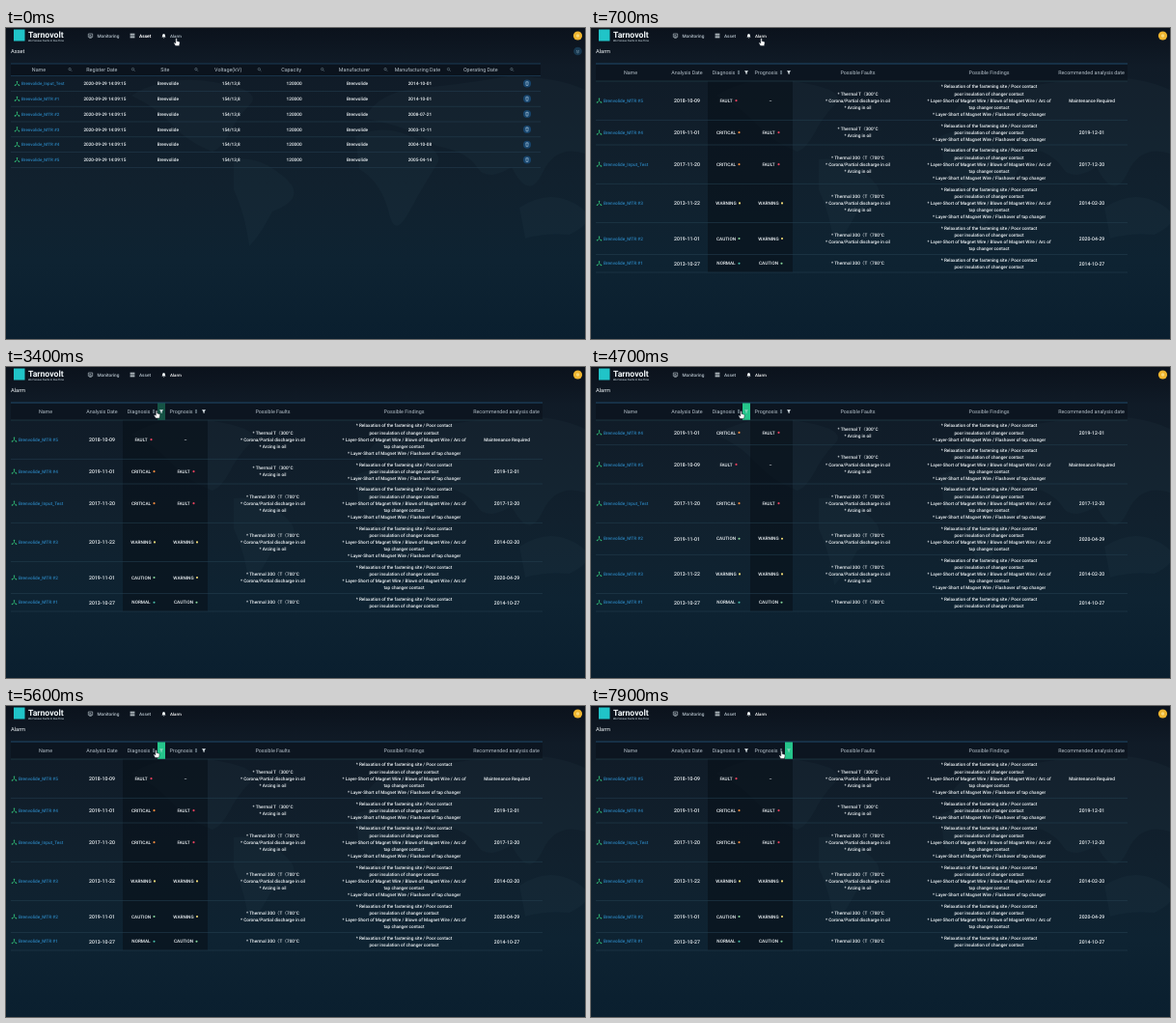
An HTML page for the animation above (8 s loop, 600 by 322 pixels).

```html
<!DOCTYPE html>
<html lang="en">
<head>
<meta charset="utf-8">
<title>Alarm table</title>
<style>
html, body { margin: 0; width: 100%; height: 100%; overflow: hidden; background: #0b1c29; }
svg { display: block; width: 100%; height: 100%; }
text { font-family: Roboto, "Noto Sans CJK KR", "Noto Sans CJK", sans-serif; text-rendering: geometricPrecision; white-space: pre; }
</style>
</head>
<body>
<svg id="stage" viewBox="0 0 600 322" preserveAspectRatio="none"></svg>
<script>
const stage = document.getElementById('stage');
const COMPANY = 'Brenvolide';
const BLUE = '#2a80b8', PALE = '#eef3f6', HEAD = '#b6c2cb', RULE = '#223c4d';

// y is the vertical middle of the text
const text = (x, y, s, size = 4.7, fill = PALE, anchor = 'middle', weight = 500) =>
  `<text x="${x}" y="${y + size * 0.36}" font-size="${size}" fill="${fill}" text-anchor="${anchor}" font-weight="${weight}">${s}</text>`;
const rect = (x, y, w, h, fill, extra = '') =>
  `<rect x="${x}" y="${y}" width="${w}" height="${h}" fill="${fill}" ${extra}/>`;
const dot = (x, y, r, fill) => `<circle cx="${x}" cy="${y}" r="${r}" fill="${fill}"/>`;
const path = (x, y, d, attrs) => `<path transform="translate(${x} ${y})" d="${d}" ${attrs}/>`;
const rule = (y, x2, color = RULE, w = 0.6) => rect(5, y - w / 2, x2 - 5, w, color);
const group = (id, body) => `<g id="${id}">${body}</g>`;

const treeIcon = (x, y) => path(x, y, 'M0-2V0M-2 2L0 0 2 2', 'stroke="#2fb573" stroke-width=".8" fill="none"') +
  [[0, -1.8], [-2, 1.8], [2, 1.8]].map(([a, b]) => dot(x + a, y + b, 0.8, '#2fb573')).join('');
const searchIcon = (x, y) => path(x, y, 'M.5.5L1.8 1.8M.8-.4a1.2 1.2 0 1 1-2.4 0a1.2 1.2 0 1 1 2.4 0', 'stroke="#7e94a1" stroke-width=".5" fill="none"');
const sortIcon = (x, y) => path(x, y, 'M-1.2-.6L0-2.2 1.2-.6ZM-1.2.6L0 2.2 1.2.6Z', 'fill="#9fb2bd"');
const funnel = (x, y) => path(x, y, 'M-2-1.8H2L.6.2V2L-.6 1.4V.2Z', `id="funnel${x}" fill="#dfe8ec"`);

function background() {
  const lands = [
    'M130 70Q165 48 215 56T254 78Q240 92 232 108T214 128Q188 118 172 100T130 70Z',
    'M236 136Q262 132 288 154T276 190Q264 214 252 226Q247 190 236 168Z',
    'M362 112Q392 98 424 114T446 142Q432 164 418 190T398 196Q390 160 366 146Z',
    'M372 94Q384 66 430 62T520 50Q570 50 600 64V130Q570 120 556 150T524 144Q498 160 488 144T446 122Q420 102 372 94Z',
    'M532 186Q562 166 590 182T584 214Q556 212 538 218Z'
  ];
  return `<defs>
    <linearGradient id="sky" x2="0" y2="1">
      <stop offset="0" stop-color="#0b121c"/><stop offset=".12" stop-color="#101b27"/>
      <stop offset=".5" stop-color="#11212e"/><stop offset=".75" stop-color="#0e2332"/>
      <stop offset="1" stop-color="#0a1f2f"/>
    </linearGradient></defs>` +
    rect(0, 0, 600, 322, 'url(#sky)') +
    `<path d="${lands.join('')}" fill="#3d566a" opacity=".09"/>`;
}

function topBar() {
  const stroke = 'stroke="#c4d0d7" stroke-width=".6" fill="none"';
  return rect(8, 1.5, 11.5, 12, '#20c4c8') +
    text(23, 6.5, 'Tarnovolt', 8.7, '#f2f7f9', 'start', 700) +
    text(23, 13.2, 'We Foresee Faults In Due Time', 2.7, '#bccbd3', 'start') +
    path(87.5, 8, 'M-2.2-2H2.2V1.4H-2.2ZM-1.2 2.4H1.2M-1 .5V-.6M0 .5V-1M1 .5V-.2', stroke) +
    path(131, 8, 'M-2.4-1.8H2.4M-2.4 0H2.4M-2.4 1.8H2.4', 'stroke="#dce5ea" stroke-width="1.1"') +
    path(163.5, 8, 'M-2 1.4Q-1.4.8-1.4-.6A1.4 1.5 0 0 1 1.4-.6Q1.4.8 2 1.4ZM-.7 1.9H.7L0 2.6Z', 'fill="#eef3f5"') +
    text(94.5, 8, 'Monitoring', 4.7, HEAD, 'start') +
    dot(592.5, 8, 4.6, '#efb52f') + dot(592.5, 8, 1.7, '#f8d878');
}

function assetPage() {
  const heads = ['Name', 'Register Date', 'Site', 'Voltage(kV)', 'Capacity', 'Manufacturer', 'Manufacturing Date', 'Operating Date'];
  const made = ['2014-10-01', '2014-10-01', '2008-07-21', '2003-12-11', '2004-10-08', '2005-04-14'];
  const col = i => 34 + i * 65.4;
  let out = text(138, 8, 'Asset', 4.75, '#fff', 'start', 700) + text(170, 8, 'Alarm', 4.4, HEAD, 'start') +
    text(5, 24, 'Asset', 5.7, PALE, 'start', 400) +
    dot(592.5, 24, 4.3, '#173850') + path(592.5, 24, 'M-1.5-1L0 .2 1.5-1M-1.5.6L0 1.8 1.5.6', 'stroke="#89a4b5" stroke-width=".6" fill="none"') +
    rect(5, 37, 549, 12, '#0a111a', 'opacity=".75"') + rule(37, 554, '#1f4968', 0.7) + rule(49.3, 554, '#1f4460');
  heads.forEach((h, i) => out += text(col(i), 43, h, 5.4, HEAD, 'middle', 400) + searchIcon(66.5 + i * 65.4, 43));
  made.forEach((date, i) => {
    const y = 57.5 + i * 15.8;
    const cells = ['2020-09-29 14:09:15', COMPANY, '154/13,8', '120000', COMPANY, date];
    out += treeIcon(11.5, y) + text(16, y, `${COMPANY}_${i ? 'MTR #' + i : 'Input_Test'}`, 4.5, BLUE, 'start') +
      cells.map((c, k) => text(col(k + 1) + (k > 4 ? 2.5 : 3), y, c)).join('') +
      dot(540, y, 4, '#17456d') + path(540, y, 'M-1.6-1.5H1.6M-.6-2.1H.6M-1.2-1.2L-.9 2H.9L1.2-1.2', 'stroke="#a9c8df" stroke-width=".6" fill="none"') +
      rule(y + 7.9, 554);
  });
  return out;
}

const LOW = '* Thermal T〈300°C', HIGH = '* Thermal 300〈T〈700°C';
const CORONA = '* Corona/Partial discharge in oil', ARC = '* Arcing in oil';
const LOOSE = ['* Relaxation of the fastening site / Poor contact', 'poor insulation of changer contact'];
const BLOWN = ['* Layer-Short of Magnet Wire / Blown of Magnet Wire / Arc of', 'tap changer contact'];
const FLASH = '* Layer-Short of Magnet Wire / Flashover of tap changer';
const ALL = [...LOOSE, ...BLOWN, FLASH];
const ALARMS = {
  5: ['MTR #5', '2018-10-09', 'FAULT', '–', [LOW, CORONA, ARC], ALL, 'Maintenance Required'],
  4: ['MTR #4', '2019-11-01', 'CRITICAL', 'FAULT', [LOW, ARC], [...LOOSE, FLASH], '2019-12-01'],
  0: ['Input_Test', '2017-11-20', 'CRITICAL', 'FAULT', [HIGH, CORONA, ARC], ALL, '2017-12-20'],
  3: ['MTR #3', '2013-11-22', 'WARNING', 'WARNING', [HIGH, CORONA, ARC], ALL, '2014-02-20'],
  2: ['MTR #2', '2019-11-01', 'CAUTION', 'WARNING', [HIGH, CORONA], [...LOOSE, ...BLOWN], '2020-04-29'],
  1: ['MTR #1', '2013-10-27', 'NORMAL', 'CAUTION', [HIGH], LOOSE, '2014-10-27']
};
const LEVELS = { FAULT: '#e5405c', CRITICAL: '#ef8a3e', WARNING: '#f3dc78', CAUTION: '#86d59a', NORMAL: '#48bda9' };

const lines = (x, y, list) => list.map((s, i) => text(x, y + (i - (list.length - 1) / 2) * 7.2, s)).join('');
function status(x, y, level) {
  const gap = { FAULT: 10.5, WARNING: 14 }[level] || 13.5;
  return text(x + (level in LEVELS ? 0 : 2), y, level) + (level in LEVELS ? dot(x + gap, y, 1.05, LEVELS[level]) : '');
}

function alarmRows(order) {
  let top = 55, out = '';
  for (const id of order) {
    const [name, date, diagnosis, prognosis, faults, findings, next] = ALARMS[id];
    const height = findings.length * 7.25 + 4, y = top + height / 2;
    out += treeIcon(8.5, y) + text(13, y, `${COMPANY}_${name}`, 4.7, BLUE, 'start') +
      text(99.5, y, date, 5.2) + status(140, y, diagnosis) + status(184, y, prognosis) +
      lines(276.5, y, faults) + lines(412.5, y, findings) +
      text(519, y, next, next.length > 10 ? 4.75 : 5.1);
    top += height;
    out += rule(top, 556);
  }
  return out;
}

function alarmPage() {
  const heads = [[41, 'Name'], [99.5, 'Analysis Date'], [137.5, 'Diagnosis'], [181.5, 'Prognosis'],
    [276.5, 'Possible Faults'], [412.5, 'Possible Findings'], [518.5, 'Recommended analysis date']];
  return text(138, 8, 'Asset', 4.7, HEAD, 'start') + text(170, 8, 'Alarm', 4.4, '#fff', 'start') +
    text(5, 24, 'Alarm', 5.7, PALE, 'start', 400) +
    rect(5, 37, 551, 18, '#0a131d', 'opacity=".7"') +
    rect(121, 55, 44, 198, '#070f18', 'id="shade" opacity=".6"') + rect(165, 55, 44, 198, '#070f18', 'opacity=".6"') +
    rule(37, 556, '#24557b', 0.8) + rule(55, 556, '#26424f') +
    heads.map(([x, h]) => text(x, 46, h, 5.35, HEAD, 'middle', 400)).join('') +
    [153, 197].map(x => sortIcon(x, 46) + rect(x + 4, 37.4, 8, 17.4, '#25c58b', `id="cell${x}"`) + funnel(x + 8, 46)).join('') +
    group('first', alarmRows([5, 4, 0, 3, 2, 1])) + group('second', alarmRows([4, 5, 0, 2, 3, 1]));
}

const outline = 'fill="#fff" stroke="#16212a" stroke-width=".5" stroke-linejoin="round"';
stage.innerHTML = background() + topBar() + group('assets', assetPage()) + group('alarms', alarmPage()) +
  group('cursor',
    path(0, 0, 'M0 0V6L1.4 4.8 2.4 7 3.4 6.5 2.4 4.4H4.2Z', outline + ' id="arrow"') +
    path(0, 0, 'M-.7.4Q0-.5.7.4V3L3.2 3.7Q3.8 4 3.6 5L3 8H-.8L-2.6 5.2Q-2.4 4.2-1.5 4.7L-.7 5.3Z', outline + ' id="hand"'));

const el = id => document.getElementById(id);
const show = (id, on) => el(id).style.display = on ? '' : 'none';
const ramp = (t, a, b) => Math.min(1, Math.max(0, (t - a) / (b - a)));
const ease = k => k * k * (3 - 2 * k);

// time, x, y of the pointer tip
const TRACK = [[0, 176.5, 10.5], [1000, 176.5, 10.5], [1800, 168.5, 32], [2300, 168.5, 32],
  [3100, 156, 45], [3800, 156, 45], [4400, 155.5, 45.5], [6100, 155.5, 45.5], [6900, 197.5, 46.5], [8000, 197.5, 46.5]];

// a filter cell brightens under the pointer, then turns solid when clicked
function highlight(x, hover, click) {
  el('cell' + x).style.opacity = 0.35 * hover + 0.65 * click;
  el('funnel' + (x + 8)).style.opacity = 1 - 0.5 * click;
}

function draw(t) {
  const i = TRACK.findIndex(p => p[0] > t), [t0, x0, y0] = TRACK[i - 1], [t1, x1, y1] = TRACK[i];
  const k = ease(ramp(t, t0, t1)), x = x0 + (x1 - x0) * k, y = y0 + (y1 - y0) * k;
  const hand = y < 16 || y > 42;
  el('cursor').setAttribute('transform', `translate(${x} ${y})`);
  show('hand', hand);
  show('arrow', !hand);

  const alarm = t >= 300, swapped = t >= 4000 && t < 5200, left = t < 6300;
  show('assets', !alarm);
  show('alarms', alarm);
  show('first', !swapped);
  show('second', swapped);
  show('shade', !swapped);
  highlight(153, left * ramp(t, 3000, 3200), left * ramp(t, 3900, 4100));
  highlight(197, ramp(t, 6700, 6850), ramp(t, 7100, 7300));
}

(function frame() {
  draw(performance.now() % 8000);
  requestAnimationFrame(frame);
})();
</script>
</body>
</html>
```
